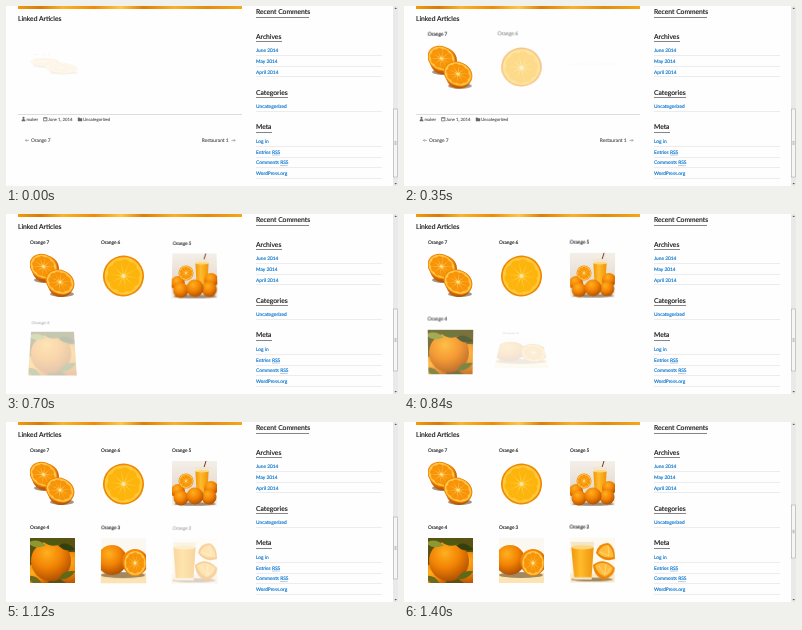
Write an HTML page that moves like this. It is 392 px wide and 180 px high and loops after 2.1 s.

```html
<!DOCTYPE html>
<html lang="en">
<head>
<meta charset="utf-8">
<title>Linked Articles</title>
<style>
html, body { margin: 0; width: 100%; height: 100%; overflow: hidden; background: #fdfefd; }
#stage { position: relative; width: 392px; height: 180px; overflow: hidden; }
svg { position: absolute; font-family: Lato, sans-serif; text-rendering: geometricPrecision; }
text { stroke-width: .14px; }
.item { overflow: visible; width: 45px; height: 60px; transform-origin: 22.5px 33px; }
.item text { font-size: 4.75px; fill: #222; stroke: #222; }
.head { font-size: 6.75px; fill: #111; stroke: #111; }
.link { font-size: 4.85px; fill: #0873cf; stroke: #0873cf; }
.meta { font-size: 4.3px; fill: #666; stroke: #666; }
.nav { font-size: 4.8px; fill: #555; stroke: #555; }
</style>
</head>
<body>
<div id="stage">
  <svg id="page" width="392" height="180" viewBox="0 0 392 180">
    <defs>
      <linearGradient id="strip">
        <stop offset="0" stop-color="#f39a0c"/><stop offset=".1" stop-color="#d97a08"/>
        <stop offset=".2" stop-color="#fbb427"/><stop offset=".34" stop-color="#f08a08"/>
        <stop offset=".46" stop-color="#ffc64a"/><stop offset=".56" stop-color="#e07c06"/>
        <stop offset=".7" stop-color="#fbb02a"/><stop offset=".84" stop-color="#e58a0c"/>
        <stop offset="1" stop-color="#f9a51a"/>
      </linearGradient>
      <radialGradient id="peel" cx=".4" cy=".3" r=".75">
        <stop offset="0" stop-color="#ffb01e"/><stop offset=".5" stop-color="#f28204"/>
        <stop offset="1" stop-color="#a84a02"/>
      </radialGradient>
      <linearGradient id="juice">
        <stop offset="0" stop-color="#f0960a"/><stop offset=".4" stop-color="#ffbc2c"/>
        <stop offset="1" stop-color="#ee940c"/>
      </linearGradient>
      <linearGradient id="table" x2="0" y2="1">
        <stop offset="0" stop-color="#f3efe9"/><stop offset=".6" stop-color="#e6dccf"/>
        <stop offset="1" stop-color="#f6f1ea"/>
      </linearGradient>
    </defs>
    <rect x="12" width="224" height="3" fill="url(#strip)"/>
    <text class="head" x="12" y="15.2">Linked Articles</text>
    <g id="side"></g>
    <g id="foot">
      <path d="M12 108.5H236" stroke="#ddd"/>
      <g fill="#666">
        <circle cx="17.5" cy="111.8" r="1.1"/><path d="M15.5 115.3q0-2.2 2-2.2t2 2.2z"/>
        <path d="M37.3 111.2h4v4h-4zM38 112.6v2h2.6v-2z" fill-rule="evenodd"/>
        <path d="M71.8 111.5h1.6l.5.7h2.3v3h-4.4z"/>
      </g>
      <text class="meta" x="20.5" y="114.8">maker</text>
      <text class="meta" x="42" y="114.8">June 1, 2014</text>
      <text class="meta" x="77" y="114.8">Uncategorized</text>
      <text class="nav" x="25" y="136">Orange 7</text>
      <text class="nav" x="195.8" y="136">Restaurant 1</text>
      <path d="M23 134.4h-3.6m1.2-1.2l-1.2 1.2 1.2 1.2M225.5 134.4h3.6m-1.2-1.2l1.2 1.2-1.2 1.2"
        fill="none" stroke="#666" stroke-width=".5"/>
    </g>
    <rect x="387" width="5" height="180" fill="#e9e9e9"/>
    <path d="M388.5 3l1.2-1.5 1.2 1.5zM388.5 177l1.2 1.5 1.2-1.5z" fill="#555"/>
    <rect id="thumb" x="387.5" width="4" fill="#f6f6f6" stroke="#aaa" stroke-width=".6"/>
    <path id="grip" d="M388.500-1.300h2m-2 1.300h2m-2 1.300h2" stroke="#777" stroke-width=".5"/>
  </svg>
</div>
<script>
const $ = id => document.getElementById(id);

// Sidebar
const head = (s, y, w) =>
  `<text class="head" x="250" y="${y}">${s}</text>
   <path d="M250 ${Math.floor(y + 3) + .5}h${w}" stroke="#666" stroke-width=".8"/>`;
const link = (s, y) =>
  `<text class="link" x="250" y="${y}">${s}</text>
   <path d="M250 ${Math.floor(y + 3.3) + .5}H376" stroke="#ececec"/>`;
const dots = (x, y) =>
  `<path d="M${x} ${y}h8" stroke="#0873cf" stroke-width=".6" stroke-dasharray=".6 .5"/>`;
$('side').innerHTML =
  head('Recent Comments', 8, 53) +
  head('Archives', 32.6, 26) +
  link('June 2014', 46.3) + link('May 2014', 56.9) + link('April 2014', 67.5) +
  head('Categories', 88.8, 32) + link('Uncategorized', 102.1) +
  head('Meta', 123.4, 16) +
  link('Log in', 137) + link('Entries RSS', 147.7) + link('Comments RSS', 158.3) +
  link('WordPress.org', 169) + dots(266, 149) + dots(274, 159.6);

// Thumbnails, each 45 by 45
const ball = (x, y, r) => `<circle cx="${x}" cy="${y}" r="${r}" fill="url(#peel)"/>`;

function slice(x, y, rx, ry, tilt, pulp = '#f79408', pith = '#ffc54e') {
  const n = 10, cells = [];
  for (let i = 0; i < n; i++)
    cells.push(`<path transform="rotate(${i * 360 / n})" d="M0-2.500L-4.800-14Q0-19 4.800-14z" fill="${pulp}"/>`);
  return `<g transform="translate(${x} ${y}) rotate(${tilt}) scale(${rx / 20} ${ry / 20})">
    <circle r="20" fill="#f08804"/><circle r="18.4" fill="${pith}"/>${cells.join('')}
    <circle r="2" fill="#ffe7a6"/></g>`;
}

const shade = (x, y, rx, ry) =>
  `<ellipse cx="${x}" cy="${y}" rx="${rx}" ry="${ry}" fill="#4a2a08" opacity=".5"/>`;

const glass = (x, y, w, h) =>
  `<path d="M${x} ${y}h${w}l${-w * .1} ${h}h${-w * .8}z" fill="#f3e6cc"/>
   <path d="M${x + .4} ${y + h * .14}h${w - .8}l${-w * .09} ${h * .8}h${-w * .76}z" fill="url(#juice)"/>
   <ellipse cx="${x + w / 2}" cy="${y + h * .14}" rx="${w / 2 - .4}" ry="${w * .09}" fill="#ffd67a"/>`;

const leaf = (x, y, turn, fill) =>
  `<path transform="translate(${x} ${y}) rotate(${turn})" d="M0 0Q8-7 18 0 8 6 0 0" fill="${fill}"/>`;

const fill = color => `<rect width="45" height="45" fill="${color}"/>`;

const pics = [
  shade(15, 27, 11, 3) + ball(15.5, 16, 13.5) + slice(13.5, 13.5, 14.5, 12, 30) +
    shade(32, 41, 12, 3) + ball(31, 31, 13) + slice(30, 29, 15, 12, 28),
  slice(22.5, 23, 20.5, 20.5, 8, '#fdb50e', '#ffc838'),
  fill('url(#table)') + `<path d="M34 0l-4 13" stroke="#7a3a20" stroke-width="1"/>` +
    glass(23, 6, 14, 30) + ball(39, 27, 7) + ball(6, 30, 7) + slice(14, 20, 7.5, 7.5, 0) +
    shade(23, 43, 21, 1.8) + ball(37, 36, 7.5) + ball(9, 37, 7.5) + ball(23, 35, 8.5),
  fill('#5a5212') + ball(42, 30, 16) + ball(5, 40, 14) + ball(21, 23, 20) +
    leaf(28, 7, 15, '#33400e') + leaf(-2, 5, 8, '#8a9a30') + leaf(14, 4, 5, '#4c5a12') +
    leaf(29, 41, -25, '#5c6a1a') + leaf(-3, 38, 30, '#6c6a1c'),
  fill('#fbf8f2') + `<rect y="35" width="45" height="10" fill="#fbe3b4"/>` +
    shade(22, 37, 22, 3) + ball(11, 22, 15) + ball(34, 24, 13) + slice(34, 25, 11.5, 13, 0),
  fill('#fdf9ef') + `<rect y="36" width="45" height="9" fill="#fbe9c6"/>` + shade(22, 42, 21, 2) +
    glass(1, 4, 23, 38) +
    `<path d="M26 15q2-10 12-10 7 3 7 16-12 4-19-6z" fill="#ee8604"/>
     <path d="M28 15q3-8 10-8 5 4 5.500 12-9 2-15.500-4z" fill="#ffbc3c"/>
     <path d="M23 27q11-9 22 3 0 8-10 12-11-2-12-15z" fill="#ee8604"/>
     <path d="M25 27.500q9-6 18 2.500-1 6-8 9-8-3-10-11.500z" fill="#ffbc3c"/>
     <path d="M29 28l6 9 1-11m0 11l5-7M30 14l9 4-1-10" fill="none" stroke="#ffe4a0" stroke-width=".6"/>`
];

// Each card flips in, 200 ms after the one before
const SPAN = 625, GAP = 200, LEAD = 92;
const flip = (offset, deg, easing = 'ease') =>
  ({ offset, easing, transform: `perspective(120px) rotateX(${deg}deg)` });
const turns = [
  flip(0, 90, 'ease-in'), flip(.4, -20, 'ease-in'), flip(.6, 10), flip(.8, -5), flip(1, 0)
];
const fade = [
  { offset: 0, opacity: 0, easing: 'ease-in' }, { offset: .6, opacity: 1 }, { offset: 1, opacity: 1 }
];

const cards = pics.map((pic, i) => {
  const el = document.createElementNS('http://www.w3.org/2000/svg', 'svg');
  el.setAttribute('class', 'item');
  el.style.left = 24 + i % 3 * 71 + 'px';
  el.style.top = (i < 3 ? 24 : 101) + 'px';
  el.innerHTML = `<text y="6.2">Orange ${7 - i}</text>
    <svg y="15" width="45" height="45" viewBox="0 0 45 45">${pic}</svg>`;
  $('stage').append(el);
  return [turns, fade].map(keys => {
    const anim = el.animate(keys, { duration: SPAN, fill: 'backwards' });
    anim.pause();
    return anim;
  });
});

// The page grows as the second row arrives, so the thumb shrinks and rises
const bars = [
  { from: 0, y: 103, h: 68 }, { from: 3 * GAP, y: 95, h: 62 }, { from: 6.5 * GAP, y: 83, h: 53 }
];

const LOOP = 2100, STEP = 70, REST = 1400;

function draw(now) {
  const t = Math.min(Math.floor(now % LOOP / STEP) * STEP, REST) + LEAD;
  cards.forEach((anims, i) => anims.forEach(a => {
    a.currentTime = Math.min(Math.max(t - i * GAP, 0), SPAN);
  }));
  $('foot').style.display = t < 3 * GAP ? '' : 'none';
  const bar = bars.filter(b => t >= b.from).pop();
  $('thumb').setAttribute('y', bar.y);
  $('thumb').setAttribute('height', bar.h);
  $('grip').setAttribute('transform', `translate(0 ${bar.y + bar.h / 2})`);
}

const start = performance.now();
function tick() {
  draw(performance.now() - start);
  requestAnimationFrame(tick);
}
tick();
</script>
</body>
</html>
```
